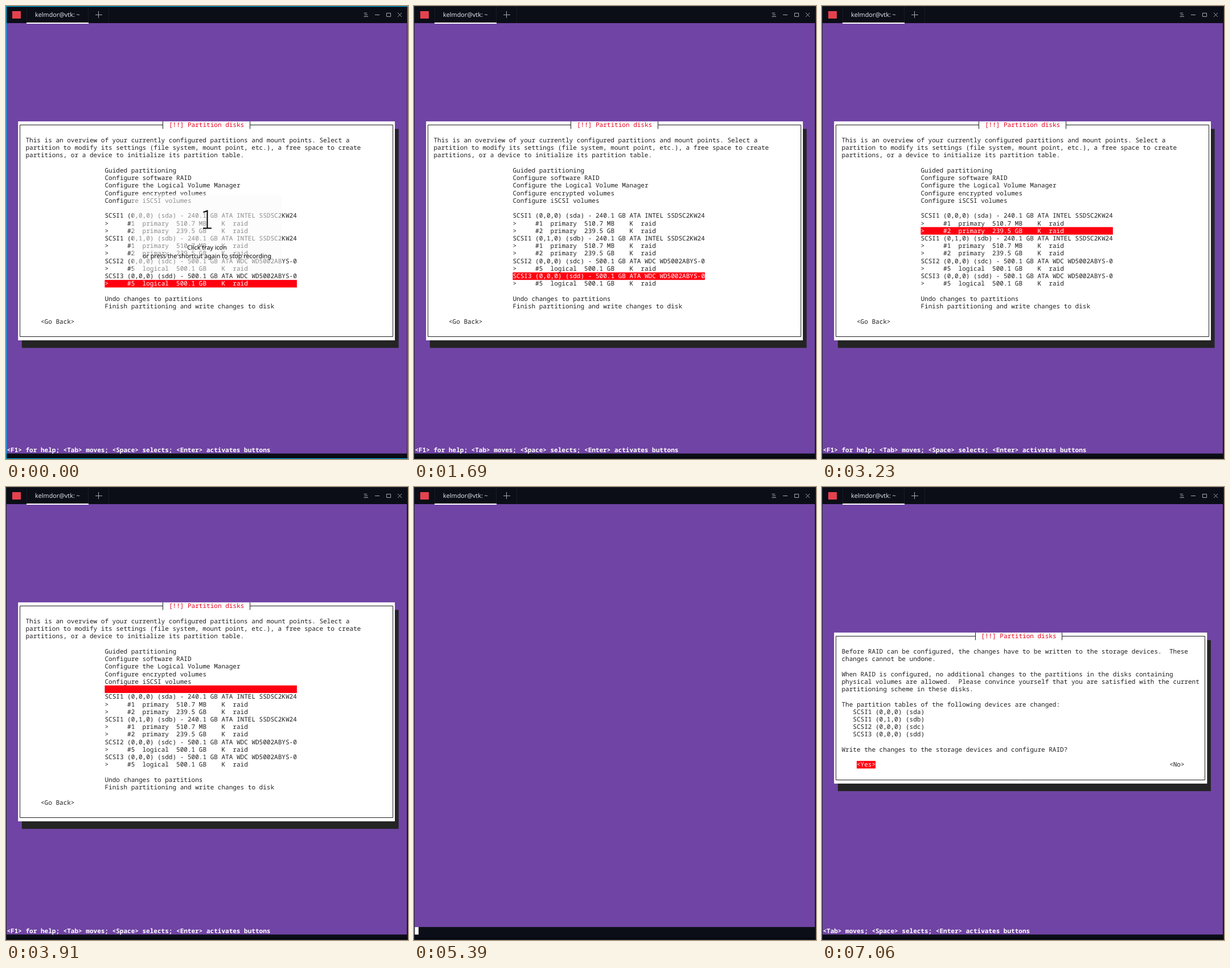
Write an HTML page with a canvas that moves like this. It is 706 by 794 pixels and loops after 8000 ms.

```html
<!DOCTYPE html>
<html lang="en">
<head>
<meta charset="utf-8">
<title>Partition disks</title>
<style>
  html, body { margin: 0; width: 100%; height: 100%; overflow: hidden; background: #0b0e17; }
  canvas { display: block; }
</style>
</head>
<body>
<canvas id="stage" width="706" height="794"></canvas>
<script>
const ctx = document.getElementById('stage').getContext('2d');
const LOOP = 8000;
const SCALE = 794 / 960;
const CELL = { x: 1.4, y: 30.2, w: 8 * SCALE, h: 16 * SCALE };
const PURPLE = '#7044a4', DARK = '#0b0e17', RED = '#ff0010', INK = '#1e1e1e', WHITE = '#fff';
const MONO = '13.333px "Noto Sans Mono", monospace';
const SANS = '13px "Noto Sans", sans-serif';

const MENU_COL = 26, MENU_ROW = 19, MENU_WIDTH = 51;
const part = (id, kind, size) => `>     #${id}  ${kind}  ${size}    K  raid`;
const ssd = [part(1, 'primary', '510.7 MB'), part(2, 'primary', '239.5 GB')];
const hdd = part(5, 'logical', '500.1 GB');
const MENU = [
  'Guided partitioning',
  'Configure software RAID',
  'Configure the Logical Volume Manager',
  'Configure encrypted volumes',
  'Configure iSCSI volumes',
  '',
  'SCSI1 (0,0,0) (sda) - 240.1 GB ATA INTEL SSDSC2KW24', ...ssd,
  'SCSI1 (0,1,0) (sdb) - 240.1 GB ATA INTEL SSDSC2KW24', ...ssd,
  'SCSI2 (0,0,0) (sdc) - 500.1 GB ATA WDC WD5002ABYS-0', hdd,
  'SCSI3 (0,0,0) (sdd) - 500.1 GB ATA WDC WD5002ABYS-0', hdd,
  '',
  'Undo changes to partitions',
  'Finish partitioning and write changes to disk',
];
const OVERVIEW = [
  'This is an overview of your currently configured partitions and mount points. Select a',
  'partition to modify its settings (file system, mount point, etc.), a free space to create',
  'partitions, or a device to initialize its partition table.',
];
const CONFIRM = [
  'Before RAID can be configured, the changes have to be written to the storage devices.  These',
  'changes cannot be undone.',
  '',
  'When RAID is configured, no additional changes to the partitions in the disks containing',
  'physical volumes are allowed.  Please convince yourself that you are satisfied with the current',
  'partitioning scheme in these disks.',
  '',
  'The partition tables of the following devices are changed:',
  '   SCSI1 (0,0,0) (sda)',
  '   SCSI1 (0,1,0) (sdb)',
  '   SCSI2 (0,0,0) (sdc)',
  '   SCSI3 (0,0,0) (sdd)',
  '',
  'Write the changes to the storage devices and configure RAID?',
];
const KEYS = '<Tab> moves; <Space> selects; <Enter> activates buttons';

// Times at which the menu cursor moves up one row
const KEY_UPS = [1690, 2020, 2250, 2490, 2780, 2990, 3230, 3470, 3680, 3910, 4130, 4370, 4600, 4860];
const COUNTDOWN_END = 50, CLEARED = 5390, CONFIRM_SHOWN = 5440, YES_CHOSEN = 7060;

const colX = col => CELL.x + col * CELL.w;
const rowY = row => CELL.y + row * CELL.h;

function rect(x, y, w, h, color) {
  ctx.fillStyle = color;
  ctx.fillRect(x, y, w, h);
}

function cells(col, row, cols, rows, color) {
  rect(colX(col), rowY(row), cols * CELL.w, rows * CELL.h, color);
}

function lines(color, width, ...paths) {
  ctx.strokeStyle = color;
  ctx.lineWidth = width;
  ctx.beginPath();
  for (const [start, ...rest] of paths) {
    ctx.moveTo(...start);
    rest.forEach(point => ctx.lineTo(...point));
  }
  ctx.stroke();
}

function text(string, x, y, font, color, align = 'left') {
  ctx.save();
  ctx.translate(x, y);
  ctx.scale(SCALE, SCALE);
  ctx.font = font;
  ctx.textRendering = 'geometricPrecision';
  ctx.textAlign = align;
  ctx.fillStyle = color;
  ctx.fillText(string, 0, 0);
  ctx.restore();
}

function print(string, col, row, color = INK, font = MONO) {
  text(string, colX(col), rowY(row) + 12.4 * SCALE, font, color);
}

function option(string, col, row, selected, width = string.length) {
  if (selected) cells(col, row, width, 1, RED);
  print(string, col, row, selected ? WHITE : INK);
}

function windowFrame(focusRing) {
  rect(0, 0, 706, 794, DARK);
  rect(0, 790, 706, 4, '#06080e');
  for (const x of [36, 144, 180]) rect(x, 1, 1, 29, '#171b24');
  rect(11, 9, 15, 13, '#e5424f');
  text('kelmdor@vtk: ~', 51, 19, SANS, '#dfe3ea');
  rect(1, 30, 703, 754.4, PURPLE);
  rect(36, 29, 109, 2, WHITE);

  lines('#a4a8af', 1,
    [[157, 15.5], [169, 15.5]], [[162.5, 9], [162.5, 21]],
    [[628.5, 12.5], [634, 12.5]], [[629.5, 15.5], [635, 15.5]], [[628.5, 18.5], [636, 18.5]],
    [[648, 15.5], [656, 15.5]],
    [[668.5, 12.5], [675.5, 12.5], [675.5, 18.5], [668.5, 18.5], [668.5, 12]],
    [[688, 12], [695, 19]], [[695, 12], [688, 19]]);

  ctx.strokeStyle = focusRing ? '#08a8dc' : '#23262d';
  ctx.lineWidth = focusRing ? 1.5 : 1;
  ctx.strokeRect(0.5, 0.5, 705, 793);
}

function dialog(row, cols, rows, titleCol) {
  const col = 3, title = '[!!] Partition disks';
  const midX = c => Math.floor(colX(c + 0.5)) + 0.5;
  const midY = r => Math.floor(rowY(r + 0.5)) + 0.5;
  cells(col + 1, row + 1, cols, rows, '#242424');
  cells(col, row, cols, rows, WHITE);

  const left = midX(col), right = midX(col + cols - 1);
  const top = midY(row), bottom = midY(row + rows - 1);
  const tickL = midX(titleCol - 2), tickR = midX(titleCol + title.length + 1);
  lines(INK, 1,
    [[tickL, top], [left, top], [left, bottom], [right, bottom], [right, top], [tickR, top]],
    ...[tickL, tickR].map(x => [[x, rowY(row)], [x, rowY(row + 1)]]));
  print(title, titleCol, row, '#e8001c');
}

function status(string) {
  print(string, 0, 56, WHITE, 'bold ' + MONO);
}

function overviewScreen(selected) {
  dialog(13, 100, 29, 43);
  OVERVIEW.forEach((line, i) => print(line, 5, 15 + i));
  MENU.forEach((line, i) => option(line, MENU_COL, MENU_ROW + i, i === selected, MENU_WIDTH));
  print('<Go Back>', 9, 39);
  status('<F1> for help; ' + KEYS);
}

function confirmScreen(yes) {
  dialog(17, 99, 20, 42);
  CONFIRM.forEach((line, i) => print(line, 5, 19 + i));
  option('<Yes>', 9, 34, yes);
  option('<No>', 92, 34, !yes);
  status(KEYS);
}

function clearedScreen() {
  rect(1, rowY(56), 703, CELL.h + 1, DARK);
  cells(0, 56, 1, 1, WHITE);
}

function countdown() {
  ctx.fillStyle = 'rgba(249, 249, 249, 0.5)';
  ctx.beginPath();
  ctx.roundRect(222, 330, 262, 135, 4);
  ctx.fill();
  lines('#000', 2, [[346.5, 361.5], [353.5, 359], [353.5, 389]], [[346, 389.5], [361, 389.5]]);
  text('Click tray icon', 353, 427, SANS, '#000', 'center');
  text('or press the shortcut again to stop recording', 353, 442, SANS, '#000', 'center');
}

function draw(t) {
  windowFrame(t < COUNTDOWN_END);
  if (t < CLEARED) overviewScreen(15 - KEY_UPS.filter(time => time <= t).length);
  else if (t < CONFIRM_SHOWN) clearedScreen();
  else confirmScreen(t >= YES_CHOSEN);
  if (t < COUNTDOWN_END) countdown();
}

const start = performance.now();
function tick() {
  draw((performance.now() - start) % LOOP);
  requestAnimationFrame(tick);
}
tick();
</script>
</body>
</html>
```
